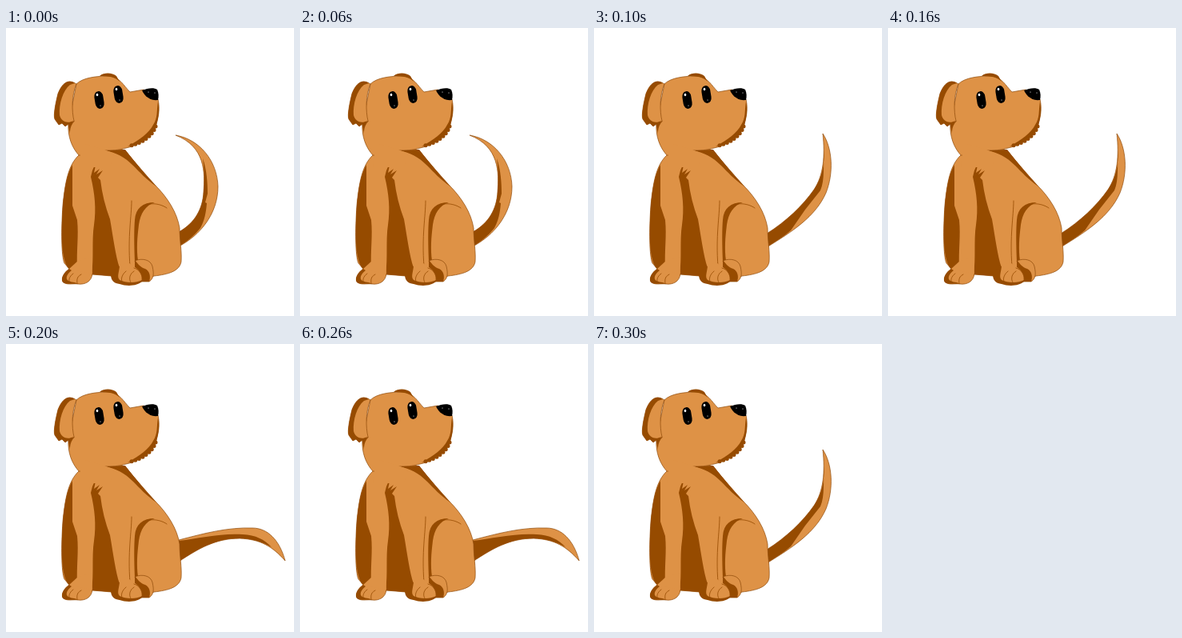
Recreate the animation shown at these times as an HTML page. Size 360 by 360 pixels, loop 400 ms.

```html
<!DOCTYPE html>
<html lang="en">
<head>
<meta charset="utf-8">
<title>Dog wagging its tail</title>
<style>
  html, body { margin: 0; width: 100%; height: 100%; overflow: hidden; background: #fff; }
  svg { display: block; width: 100vw; height: 100vh; }
  .fur { fill: #de9246; stroke: #8f4a0a; stroke-width: .7; stroke-linejoin: round; }
  .plain { stroke: none; }
  .shade { fill: #964b00; }
  .line { fill: none; stroke: #964b00; stroke-width: .8; stroke-linecap: round; }
  .beard { fill: none; stroke: #964b00; stroke-width: 5; stroke-linecap: round; stroke-dasharray: 0 5; }
</style>
</head>
<body>
<svg viewBox="0 0 360 360">
  <g class="tail">
    <path class="fur" d="M212 134C242 139 264 166 265 198C265 232 243 259 216 273V255C236 244 246 226 247 205C249 181 249 148 212 134Z"/>
    <path class="shade" d="M246 163C251 178 252 193 252 207L249 218L251 219C250 231 248 241 243 250C235 260 226 267 216 273V255C236 244 246 226 247 205C248 190 248 176 246 163Z"/>
  </g>
  <g class="tail">
    <path class="fur" d="M286 132C298 150 300 181 290 206C277 236 247 255 216 274V257C240 242 261 222 275 202C287 184 289 160 286 132Z"/>
    <path class="shade" d="M288 153C286 170 289 190 283 203L264 227L246 253C237 261 226 267 216 274V257C240 242 261 222 275 202C285 187 288 172 288 153Z"/>
  </g>
  <g class="tail">
    <path class="fur" d="M349 271C342 245 327 230 308 230C278 229 250 236 216 245V272C240 256 262 243 292 243C318 244 333 253 349 271Z"/>
    <path class="shade" d="M216 246C240 243 270 236 296 238C312 239 323 244 332 254C320 247 306 243 292 243C262 243 240 256 216 272Z"/>
  </g>

  <!-- body -->
  <path class="fur" d="M91 159C78 171 74 192 71 222C69 252 69 285 73 294L79 301L108 308L132 310L171 316L185 310C203 308 217 304 219 292C220 280 217 265 217 250C214 231 202 212 187 197C176 185 162 169 149 153L110 142Z"/>
  <path class="shade" d="M83 171C83 190 83 207 83 222L89 240C91 260 88 278 89 298L79 301C68 292 69 252 71 222C73 200 76 183 83 171Z"/>
  <path class="shade" d="M113 167L108 178L106 186C111 207 113 226 110 246C107 266 110 288 107 308L132 310L142 300C137 285 134 262 130 239C124 223 120 207 118 190L115 187L121 178L113 183L117 176L110 181Z"/>
  <path class="shade" d="M124 153L149 152C162 169 176 185 188 198C175 189 167 180 159 172C148 161 138 156 124 153Z"/>
  <path class="line" d="M157 216C157 235 152 260 155 298"/>

  <!-- haunch -->
  <path class="shade" d="M161 293C160 270 160 251 161 240C162 225 171 218 186 218C174 222 168 232 166 246C164 262 163 276 165 291Z"/>
  <path class="line" d="M165 228C174 217 191 218 201 225"/>

  <!-- paws -->
  <path class="fur plain" d="M90 291L79 301L74 306L108 309L107 286Z"/>
  <path class="fur" d="M79 301C72 306 69 313 71 317C75 322 84 319 90 320C99 321 107 317 108 307"/>
  <path class="shade" d="M79 301C72 306 68 313 71 318C76 321 84 319 91 320C85 317 78 318 76 314C75 310 78 306 82 303Z"/>
  <path class="line" d="M79 317C78 313 81 309 84 307M89 319C88 313 90 310 94 308"/>
  <path class="fur" d="M161 291C171 287 181 290 183 298C185 307 185 313 179 317H169C170 308 166 302 161 291Z"/>
  <path class="shade" d="M161 290C165 295 168 299 174 301C180 304 181 311 179 317H170C171 308 167 303 161 299Z"/>
  <path class="shade" d="M131 304C130 317 136 319 142 320C151 323 164 323 171 316L165 303L143 297Z"/>
  <path class="fur plain" d="M142 296C142 304 138 311 142 315C150 319 163 319 170 315C170 309 168 304 161 299L154 294Z"/>
  <path class="line" d="M145 317C143 313 146 307 150 304M156 318C153 313 155 307 160 304M160 300C168 302 171 310 170 316"/>

  <!-- head -->
  <path class="fur" d="M88 70C96 62 113 60 129 60C142 61 147 72 155 80L172 77L190 89C193 102 190 114 187 122C181 136 163 148 150 150C141 153 132 153 123 153L113 161L91 159C82 149 77 135 78 120Z"/>
  <path class="fur plain" d="M93 157L91 174L130 174L135 157L123 152L100 145Z"/>
  <path class="shade" d="M117 60C123 55 133 56 138 60L142 67C137 61 128 60 117 60Z"/>
  <path class="shade" d="M190 92C188 104 190 112 184 121C179 131 167 140 152 148C171 145 184 133 188 122C191 111 192 101 190 92Z"/>
  <path class="beard" d="M187 123C183 135 171 144 152 148"/>
  <path class="shade" d="M77 118L86 116C81 121 80 126 80 132Z"/>
  <path class="fur" d="M88 70C78 63 70 69 65 82C62 94 59 109 61 114L66 121L70 119L74 123L78 120L82 120L85 116C82 104 82 84 88 70Z"/>
  <path class="shade" d="M86 69C78 63 70 69 65 82C62 94 59 109 61 114L66 121L70 119L74 123L78 120L82 121L84 116C77 120 69 117 67 109C66 95 71 78 80 71Z"/>
  <g id="eye">
    <rect x="111" y="79" width="11" height="22" rx="5.5" ry="7" transform="rotate(-9 116.5 90)"/>
    <ellipse cx="114" cy="83.5" rx="1.3" ry="1.8" fill="#fff"/>
    <circle cx="118" cy="97" r=".6" fill="#fff"/>
  </g>
  <use href="#eye" x="24" y="-7"/>
  <path d="M170 78C177 75 185 74 189 77C191 81 191 86 190 90C182 91 174 87 170 78Z"/>
  <g fill="#fff"><circle cx="178" cy="80" r=".6"/><circle cx="186" cy="81" r=".6"/></g>
</svg>
<script>
  const STEP = 100;
  const WAG = [0, 1, 2, 1];
  const tails = document.querySelectorAll(".tail");
  const start = performance.now();

  function draw(now) {
    const step = Math.floor(Math.max(0, now - start) / STEP) % WAG.length;
    tails.forEach((tail, i) => { tail.style.display = i === WAG[step] ? "" : "none"; });
    requestAnimationFrame(draw);
  }
  draw(start);
</script>
</body>
</html>
```
